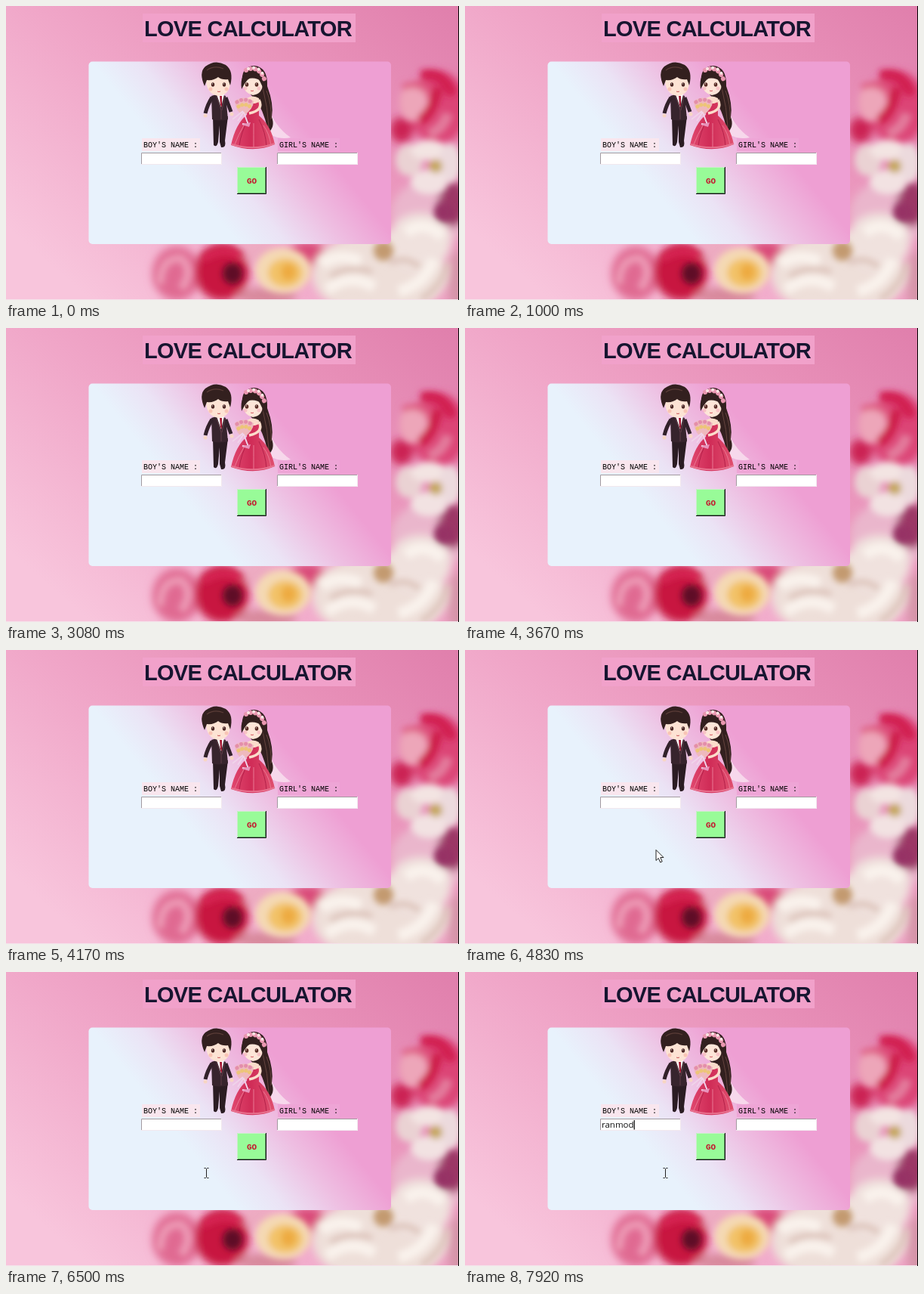
Write an HTML page that moves like this. It is 600 by 389 pixels and loops after 8000 ms.

```html
<!DOCTYPE html>
<html lang="en">
<head>
<meta charset="utf-8">
<title>Love calculator</title>
<style>
  html, body { margin: 0; width: 100%; height: 100%; overflow: hidden; }
  svg { display: block; width: 600px; height: 389px; }
  text { white-space: pre; font-kerning: none; }
  .title { font: bold 29px "Liberation Sans", sans-serif; letter-spacing: -.72px; fill: #171530; }
  .label { font: 10px "Liberation Mono", monospace; fill: #000; }
  .go { font: bold 11px "Liberation Mono", monospace; fill: #c4142c; }
  .entry { font: 11.5px "Open Sans", sans-serif; fill: #111; }
</style>
</head>
<body>
<svg viewBox="0 0 600 389">
  <defs>
    <linearGradient id="wall" x1="0" y1=".75" x2="1" y2="0">
      <stop offset="0" stop-color="#f8c5dc"/>
      <stop offset=".4" stop-color="#f0a6c8"/>
      <stop offset=".75" stop-color="#e78eb7"/>
      <stop offset="1" stop-color="#e07fac"/>
    </linearGradient>
    <linearGradient id="panel" gradientUnits="userSpaceOnUse" x1="32" y1="-26" x2="160" y2="-130">
      <stop offset="0" stop-color="#e8f2fc"/>
      <stop offset=".3" stop-color="#ebe3f5"/>
      <stop offset=".65" stop-color="#eebfe2"/>
      <stop offset="1" stop-color="#ee9fd3"/>
    </linearGradient>
    <linearGradient id="skirt" x1="0" x2="1">
      <stop offset="0" stop-color="#e0486f"/>
      <stop offset=".45" stop-color="#d02c57"/>
      <stop offset="1" stop-color="#e0506f"/>
    </linearGradient>
    <filter id="soft" x="-50%" y="-50%" width="200%" height="200%"><feGaussianBlur stdDeviation="6"/></filter>
    <filter id="mild" x="-50%" y="-50%" width="200%" height="200%"><feGaussianBlur stdDeviation="4"/></filter>
    <g id="field">
      <path d="M0 0H107V16H0Z" fill="#fff"/>
      <path d="M.5 16V.5H107" fill="none" stroke="#a39aa0"/>
      <path d="M0 15.5H106.5V0" fill="none" stroke="#f2e8ee"/>
    </g>
  </defs>

  <rect width="600" height="389" fill="url(#wall)"/>

  <!-- blurred flowers -->
  <g filter="url(#soft)">
    <ellipse cx="562" cy="275" rx="52" ry="45" fill="#eab6cc"/>
    <ellipse cx="573" cy="135" rx="40" ry="48" fill="#dc4576"/>
    <ellipse cx="524" cy="164" rx="15" ry="17" fill="#cb2153"/>
    <ellipse cx="592" cy="262" rx="20" ry="30" fill="#9c3766"/>
    <ellipse cx="226" cy="354" rx="32" ry="36" fill="#e06a92"/>
    <ellipse cx="286" cy="352" rx="36" ry="38" fill="#c8133f"/>
    <ellipse cx="400" cy="328" rx="24" ry="16" fill="#d94a78"/>
    <ellipse cx="335" cy="325" rx="22" ry="14" fill="#edabc1"/>
    <ellipse cx="345" cy="384" rx="40" ry="12" fill="#d8899c"/>
    <ellipse cx="495" cy="355" rx="90" ry="56" fill="#eedfd9"/>
    <ellipse cx="548" cy="312" rx="42" ry="38" fill="#f0e2de"/>
    <ellipse cx="598" cy="368" rx="12" ry="45" fill="#d695a9"/>
  </g>
  <g filter="url(#mild)">
    <path d="M550 92Q580 86 591 118" fill="none" stroke="#d11e50" stroke-width="14"/>
    <ellipse cx="540" cy="128" rx="19" ry="25" fill="#eda6b9"/>
    <path d="M525 108Q545 98 560 116" fill="none" stroke="#e06688" stroke-width="8"/>
    <path d="M572 108Q566 140 548 152" fill="none" stroke="#cd1a49" stroke-width="13"/>
    <path d="M585 142Q580 162 560 170" fill="none" stroke="#e37c9c" stroke-width="14"/>
    <ellipse cx="534" cy="204" rx="18" ry="21" fill="#ead2d3"/>
    <ellipse cx="560" cy="191" rx="24" ry="13" fill="#f3e4e2"/>
    <ellipse cx="588" cy="208" rx="15" ry="26" fill="#ecdadd"/>
    <ellipse cx="560" cy="233" rx="24" ry="16" fill="#f2e2e2"/>
    <circle cx="569" cy="212" r="9" fill="#c5a75c"/>
    <ellipse cx="580" cy="273" rx="13" ry="13" fill="#963365"/>
    <path d="M204 368Q205 332 232 334Q250 350 232 374" fill="none" stroke="#ec98b4" stroke-width="11"/>
    <ellipse cx="300" cy="354" rx="13" ry="14" fill="#5f0a25"/>
    <path d="M262 335Q285 318 312 330" fill="none" stroke="#d82654" stroke-width="9"/>
    <ellipse cx="367" cy="350" rx="37" ry="30" fill="#f4d9b4"/>
    <ellipse cx="370" cy="353" rx="23" ry="19" fill="#f2c268"/>
    <ellipse cx="374" cy="352" rx="10" ry="11" fill="#edaa40"/>
    <path d="M418 342Q440 325 470 338M425 376Q455 352 488 372M520 378Q556 368 566 335M530 300Q555 282 578 305" fill="none" stroke="#f9f2ec" stroke-width="15"/>
    <path d="M430 358Q455 342 485 352M508 340Q530 330 548 345M550 388Q578 370 586 340" fill="none" stroke="#dcc3ba" stroke-width="7"/>
    <ellipse cx="500" cy="324" rx="13" ry="13" fill="#c39a70"/>
  </g>

  <rect x="181" y="10" width="282" height="38" fill="#f1a1ca"/>
  <text class="title" x="183" y="39.500">LOVE CALCULATOR</text>
  <rect x="109.500" y="73.500" width="400.500" height="241.500" rx="5" fill="url(#panel)"/>

  <!-- bride -->
  <path d="M345 130Q356 160 377 174Q362 177 350 170Z" fill="#fbe3f0" opacity=".8"/>
  <path d="M313 104Q310 80 329 79Q347 81 346 106Q355 130 352 147Q357 160 347 168Q345 150 335 130Z" fill="#33201f"/>
  <path d="M340 108Q347 135 348 160M345 112Q352 130 351 150" fill="none" stroke="#65443f"/>
  <path d="M319 122Q327 117 335 122L336 132L318 132Z" fill="#fbdccb"/>
  <path d="M320 128Q327 131 335 127L335 145Q351 158 356 183Q329 195 298 184Q304 156 319 144Z" fill="url(#skirt)"/>
  <path d="M321 150Q311 167 309 185M335 150Q344 167 345 186" fill="none" stroke="#b32049"/>
  <path d="M315 158Q308 170 303 183M328 155Q328 170 328 187M341 158Q349 169 351 184" fill="none" stroke="#ea7893"/>
  <path d="M299 183Q328 192 356 182" fill="none" stroke="#e8718e" stroke-width="2"/>
  <path d="M335 124Q342 138 322 142M319 124L314 133" fill="none" stroke="#fbdccb" stroke-width="3.500"/>
  <path d="M313 100Q326 91 340 100Q341 116 327 118Q314 115 313 100Z" fill="#fde5d8"/>
  <path d="M312 110Q309 87 326 86Q342 87 341 112Q338 98 329 92Q319 95 312 110Z" fill="#33201f"/>
  <g fill="#5a2d27"><ellipse cx="319" cy="104" rx="2.300" ry="2.800"/><ellipse cx="332" cy="104" rx="2.300" ry="2.800"/></g>
  <path d="M318 103h1M331 103h1" stroke="#fff"/>
  <path d="M324 112Q326 113 328 112" fill="none" stroke="#d4545e"/>
  <g fill="#f5a3b6" opacity=".5"><circle cx="317" cy="109" r="2.500"/><circle cx="335" cy="109" r="2.500"/></g>
  <path d="M318 85Q335 77 343 99" fill="none" stroke="#e997b0" stroke-width="6" stroke-linecap="round" stroke-dasharray=".1 6"/>
  <path d="M321 83Q335 78 341 92" fill="none" stroke="#fbe4e4" stroke-width="4" stroke-linecap="round" stroke-dasharray=".1 7"/>

  <!-- groom -->
  <path d="M274 146H294L290 178Q292 188 285 187L283 180L283 158L281 180Q279 188 275 184Z" fill="#2b1c23"/>
  <path d="M272 119Q282 115 291 119L294 150Q283 153 273 150Z" fill="#37242d"/>
  <path d="M273 121Q267 130 264 142M291 121L298 140" fill="none" stroke="#32212a" stroke-width="5"/>
  <circle cx="264" cy="145" r="2.500" fill="#f8d6c4"/>
  <circle cx="299" cy="143" r="2.500" fill="#f8d6c4"/>
  <path d="M279 117H289L285 134Z" fill="#fff"/>
  <path d="M283 119H286L286 134L284 131Z" fill="#a61b35"/>
  <path d="M279 119L285 138V150M290 119L286 138" fill="none" stroke="#6a4450" stroke-width=".8"/>
  <path d="M265 97Q280 88 297 97Q298 118 281 119Q265 116 265 97Z" fill="#fde3d4"/>
  <path d="M263 106Q255 88 264 80Q277 70 291 78Q302 86 297 105L294 97Q286 98 281 94Q275 99 266 98Z" fill="#33201f"/>
  <path d="M266 85Q276 78 288 83" fill="none" stroke="#5b3d38" stroke-width="1.200"/>
  <g fill="#4c2724"><ellipse cx="274" cy="104" rx="2.200" ry="2.800"/><ellipse cx="289" cy="104" rx="2.200" ry="2.800"/></g>
  <path d="M273 103h1M288 103h1" stroke="#fff"/>
  <path d="M280 113Q282 114 284 113" fill="none" stroke="#c65256"/>
  <g fill="#f5a797" opacity=".5"><circle cx="271" cy="110" r="2.500"/><circle cx="292" cy="110" r="2.500"/></g>

  <!-- bouquet -->
  <path d="M303 126Q315 117 328 126Q328 136 315 145Q304 140 303 126Z" fill="#efb9bd"/>
  <path d="M306 127Q315 121 325 127" fill="none" stroke="#e48eaa" stroke-width="5" stroke-linecap="round" stroke-dasharray=".1 6"/>
  <path d="M308 133Q316 128 323 133" fill="none" stroke="#edc578" stroke-width="5" stroke-linecap="round" stroke-dasharray=".1 5"/>
  <path d="M314 139L300 150M315 140L307 152M315 141L321 157L313 156" fill="none" stroke="#f0d3ea" stroke-width="2"/>
  <path d="M312 157L324 154L322 160Z" fill="#e993bb"/>

  <rect x="180" y="175" width="77" height="17" fill="#f9e6ee"/>
  <text class="label" x="182" y="187">BOY'S NAME :</text>
  <rect x="360" y="175" width="82" height="17" fill="#eea5d6"/>
  <text class="label" x="362" y="187">GIRL'S NAME :</text>
  <use href="#field" x="179" y="194"/>
  <use href="#field" x="359" y="194"/>
  <text class="entry" id="typed" x="181" y="206"></text>
  <rect id="caret" y="196" width="1.200" height="12.500"/>

  <path d="M306 213H345V249H306Z" fill="#98fb98"/>
  <path d="M306.500 248V213.500H344" fill="none" stroke="#c9efc9"/>
  <path d="M307 247.500H343.500V214" fill="none" stroke="#5f9a63"/>
  <path d="M306 248.500H344.500V213" fill="none" stroke="#111"/>
  <text class="go" x="325.500" y="235" text-anchor="middle">GO</text>

  <path id="arrow" d="M0 0V14L3.300 11L5.700 16.500L8.200 15.400L5.800 10H10Z" fill="#fff" stroke="#222" stroke-linejoin="round"/>
  <path id="beam" d="M-3 -6.500H-1L0 -5.500L1 -6.500H3M0 -5.500V5.500M-3 6.500H-1L0 5.500L1 6.500H3" fill="none" stroke="#222"/>
  <path d="M599.500 0V389" stroke="#000"/>
  <path d="M0 388.500H599" stroke="#f4e3eb"/>
</svg>
<script>
  const LOOP = 8000, NAME = "ranmod";
  const KEY_TIMES = [7000, 7170, 7250, 7420, 7500, 7670];
  const [typed, caret, arrow, beam] =
    ["typed", "caret", "arrow", "beam"].map(id => document.getElementById(id));

  const ease = (t, from, to) => {
    const p = Math.min(1, Math.max(0, (t - from) / (to - from)));
    return p * p * (3 - 2 * p);
  };
  const show = (el, on) => el.setAttribute("visibility", on ? "visible" : "hidden");
  const place = (el, x, y) => el.setAttribute("transform", `translate(${x} ${y})`);

  function draw(t) {
    const enter = ease(t, 4500, 4820), shift = ease(t, 5250, 5670);
    place(arrow, 12 + 241 * enter + 12 * shift, 389 - 124.5 * enter);
    place(beam, 265.5, 266);
    show(arrow, t >= 4500 && t < 5670);
    show(beam, t >= 5670);

    const count = KEY_TIMES.filter(k => t >= k).length;
    typed.textContent = NAME.slice(0, count);
    caret.setAttribute("x", 181 + (count ? typed.getComputedTextLength() : 0));
    show(caret, count > 0);
  }

  const start = performance.now();
  function frame(now) {
    draw(Math.max(0, now - start) % LOOP);
    requestAnimationFrame(frame);
  }
  draw(0);
  requestAnimationFrame(frame);
</script>
</body>
</html>
```
